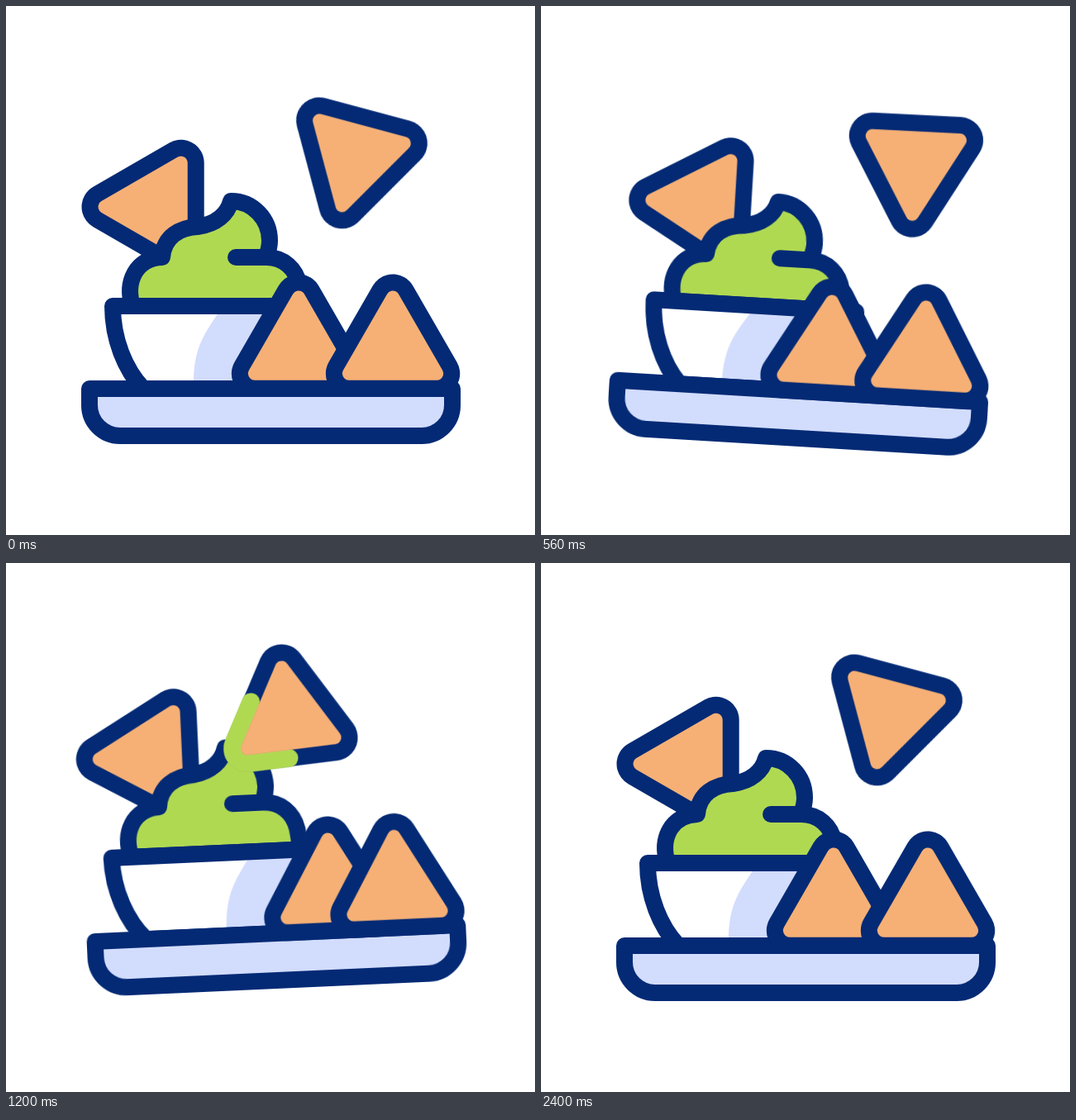
An HTML page without scripts that plays this animation: 640 by 640 pixels, repeating every 2500 ms.

```html
<!DOCTYPE html>
<html lang="en">
<head>
<meta charset="utf-8">
<title>Nachos and dip</title>
<style>
  html, body { margin: 0; width: 100%; height: 100%; overflow: hidden; background: #fff; }
  svg { display: block; width: 100vw; height: 100vh; }

  .line { stroke: #042a75; stroke-width: 20; stroke-linecap: round; stroke-linejoin: round; }
  .open { fill: none; }
  .white { fill: #fff; }
  .shade { fill: #d2dcfd; }
  .guac { fill: #b0d952; }
  .crust { fill: #042a75; stroke: #042a75; stroke-width: 56; stroke-linejoin: round; }
  .corn { fill: #f6b075; stroke: #f6b075; stroke-width: 16; stroke-linejoin: round; }
  .dip { fill: none; stroke: #b0d952; stroke-width: 21.5; stroke-linecap: round; stroke-linejoin: round; }

  .tray, .bowl, .slide, .flyer, .fresh {
    animation: 2.5s cubic-bezier(.45, 0, .55, 1) infinite;
  }
  .tray { animation-name: toss; transform-origin: 320px 320px; }
  .bowl { animation-name: sway; }
  .slide { animation-name: slide; }
  .flyer { animation-name: fly; }
  .fresh { animation-name: rise; }
  .dip { animation: coat 2.5s linear infinite; }
  .late { animation: late 2.5s step-end infinite; }
  .leave { animation: leave 2.5s linear infinite; }

  @keyframes toss {
    0%, 55.04%, 100% { transform: translateY(0) rotate(0deg); }
    13.4% { transform: translateY(41.5px) rotate(11.8deg); }
    34.64% { transform: translateY(-63px) rotate(-11deg); }
  }
  @keyframes sway {
    0%, 55.04%, 100% { transform: translateX(0); }
    13.4% { transform: translateX(24px); }
    34.64% { transform: translateX(-14.5px); }
  }
  @keyframes slide {
    0%, 32%, 59.2%, 100% { transform: translateX(0); }
    45.6% { transform: translateX(36px); }
  }
  @keyframes fly {
    0% { transform: translate(422.5px, 182px) rotate(15deg); }
    13.4% { transform: translate(532px, 197px) rotate(-14deg); }
    34.64% { transform: translate(315px, 179px) rotate(32deg); }
    44% { transform: translate(336px, 193px) rotate(57deg); }
    64%, 66.4% { transform: translate(402px, 119px) rotate(3deg); }
    80%, 100% { transform: translate(505px, 77px) rotate(-18deg); }
  }
  @keyframes rise {
    0%, 66.4% { transform: translate(228px, 339px) rotate(61deg); }
    96%, 100% { transform: translate(422.5px, 182px) rotate(15deg); }
  }
  @keyframes coat {
    0%, 30.4% { stroke-dasharray: 0 200; stroke-dashoffset: -50; opacity: 0; }
    30.41% { stroke-dasharray: 0 200; stroke-dashoffset: -50; opacity: 1; }
    37%, 100% { stroke-dasharray: 100 200; stroke-dashoffset: 0; opacity: 1; }
  }
  @keyframes late {
    0% { opacity: 0; }
    66.4%, 100% { opacity: 1; }
  }
  @keyframes leave {
    0%, 66.4% { opacity: 1; }
    79%, 100% { opacity: 0; }
  }
</style>
</head>
<body>
<svg viewBox="0 0 640 640">
  <defs>
    <path id="tri" d="M0 61.5L-53.2-30.7H53.2Z"/>
    <g id="chip">
      <use href="#tri" class="crust"/>
      <use href="#tri" class="corn"/>
    </g>
    <path id="bowl" d="M129 363H374C374 403 359 440 337 463H166C144 440 129 403 129 363Z"/>
  </defs>

  <g class="tray">
    <g class="late"><g class="fresh"><use href="#chip"/></g></g>

    <g class="bowl">
      <use href="#chip" transform="translate(181 243) rotate(90)"/>
      <path class="line guac" d="M153 363C144 334 157 305 189 304C191 279 210 268 232 267
        C254 264 268 252 272 236C299 236 319 258 319 284C319 292 317 298 315 304
        C336 304 351 318 355 338Q357 350 357 363Z"/>
      <path class="line open" d="M278 304H315"/>
      <use href="#bowl" class="white"/>
    </g>

    <path class="shade slide" d="M260 366C243 394 226 410 227 460H345V366Z"/>
    <g class="bowl"><use href="#bowl" class="line open"/></g>

    <path class="line shade" d="M101 463H540V483A37 37 0 0 1 503 520H138A37 37 0 0 1 101 483Z"/>
    <g class="slide"><use href="#chip" transform="translate(354 414) rotate(180)"/></g>
    <use href="#chip" transform="translate(468 414) rotate(180)"/>
  </g>

  <g class="leave">
    <g class="flyer">
      <use href="#tri" class="crust"/>
      <path class="dip" pathLength="100" d="M-42.5 24L-15.6 70.5A18 18 0 0 0 15.6 70.5L40 28"/>
      <use href="#tri" class="corn"/>
    </g>
  </g>
</svg>
</body>
</html>
```
